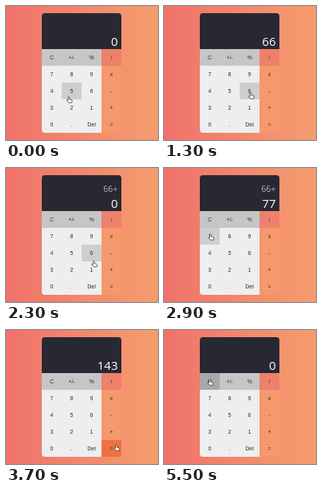
Recreate the animation shown at these times as an HTML page. Size 191x168 px, loop 5.9 s.

```html
<!DOCTYPE html>
<html lang="en">
<head>
<meta charset="utf-8">
<title>Calculator</title>
<style>
  html, body { margin: 0; width: 100%; height: 100%; overflow: hidden; background: #f38a6c; }
  svg { display: block; width: 100%; height: 100%; }
  .key text { font: 7px "Liberation Sans", Arial, sans-serif; text-anchor: middle; fill: #2d2d2d; }
  .screen { font-family: "Open Sans", "Noto Sans", sans-serif; text-anchor: end; }
  #total { font-size: 15px; fill: #fff; }
  #history { font-size: 10.5px; fill: #b4b4b9; }
</style>
</head>
<body>
<svg viewBox="0 0 191 168">
  <defs>
    <linearGradient id="sky">
      <stop offset="0" stop-color="#f0726b"/>
      <stop offset="1" stop-color="#f59d6e"/>
    </linearGradient>
    <clipPath id="body"><rect x="45" y="9" width="100" height="150" rx="4"/></clipPath>
  </defs>
  <rect width="191" height="168" fill="url(#sky)"/>
  <g clip-path="url(#body)">
    <rect x="45" y="9" width="100" height="45" fill="#282833"/>
    <g id="keys" shape-rendering="crispEdges"></g>
  </g>
  <text id="history" class="screen" x="140.3" y="30"></text>
  <text id="total" class="screen" x="140.5" y="50"></text>
  <path id="hand" fill="#fff" stroke="#222" stroke-width=".7" stroke-linejoin="round"
    d="M-1 .8a.9.9 0 0 1 1.8 0V3l2.5.6q1 .3.9 1.4L3.7 7.2H-.3L-2.5 4.6q-.3-1 .8-.8L-1 4.4Z"/>
</svg>
<script>
const LOOP = 5900, STEP = 100;
const LEFT = 45, TOP = 54, KEY_W = 25, KEY_H = 21;
const ROWS = ["C +/- % /", "7 8 9 x", "4 5 6 -", "3 2 1 +", "0 . Del ="];

// time, fingertip x, fingertip y
const PATH = [
  [0, 79, 114], [400, 109, 109], [1300, 109, 109], [1700, 138, 133],
  [1800, 138.5, 135], [2100, 138.5, 135], [2600, 58.5, 83], [2900, 58.5, 83],
  [3300, 136, 141], [3600, 138.5, 144], [4000, 138.5, 144],
  [4300, 63, 69], [4600, 57.5, 62], [LOOP, 57.5, 62]
];

// time, history, total
const SCREEN = [
  [0, "", "0"], [600, "", "6"], [900, "", "66"], [2100, "66+", "0"],
  [2700, "66+", "7"], [2900, "66+", "77"], [3600, "", "143"], [4900, "", "0"]
];

const byId = id => document.getElementById(id);
const keysGroup = byId("keys"), hand = byId("hand");
const historyText = byId("history"), totalText = byId("total");

function add(parent, tag, attrs) {
  const node = document.createElementNS("http://www.w3.org/2000/svg", tag);
  for (const name in attrs) node.setAttribute(name, attrs[name]);
  return parent.appendChild(node);
}

// [resting colour, hovered colour]
function keyColors(row, col) {
  if (col === 3) return [row ? "#f5986c" : "#ee806c", "#ef7140"];
  return row ? ["#eeeeee", "#cecece"] : ["#c6c6c6", "#a9a9a9"];
}

const keys = ROWS.flatMap((labels, row) => labels.split(" ").map((label, col) => {
  const x = LEFT + col * KEY_W, y = TOP + row * KEY_H;
  const group = add(keysGroup, "g", { class: "key" });
  const rect = add(group, "rect", { x, y, width: KEY_W, height: KEY_H });
  add(group, "text", { x: x + KEY_W / 2, y: y + 13 }).textContent = label;
  return { x, y, rect, colors: keyColors(row, col) };
}));

function pointerAt(time) {
  const next = PATH.findIndex(point => point[0] > time);
  const [t0, x0, y0] = PATH[next - 1], [t1, x1, y1] = PATH[next];
  const p = (time - t0) / (t1 - t0), ease = p * p * (3 - 2 * p);
  return [x0 + (x1 - x0) * ease, y0 + (y1 - y0) * ease];
}

function draw(now) {
  const time = Math.floor((now % LOOP) / STEP) * STEP;
  const [px, py] = pointerAt(time);
  hand.setAttribute("transform", `translate(${px} ${py})`);
  for (const { x, y, rect, colors } of keys) {
    const over = px >= x && px < x + KEY_W && py >= y && py < y + KEY_H;
    rect.setAttribute("fill", colors[+over]);
  }
  const [, history, total] = SCREEN.filter(entry => entry[0] <= time).pop();
  historyText.textContent = history;
  totalText.textContent = total;
}

const start = performance.now();
function tick() {
  draw(performance.now() - start);
  requestAnimationFrame(tick);
}
tick();
</script>
</body>
</html>
```
